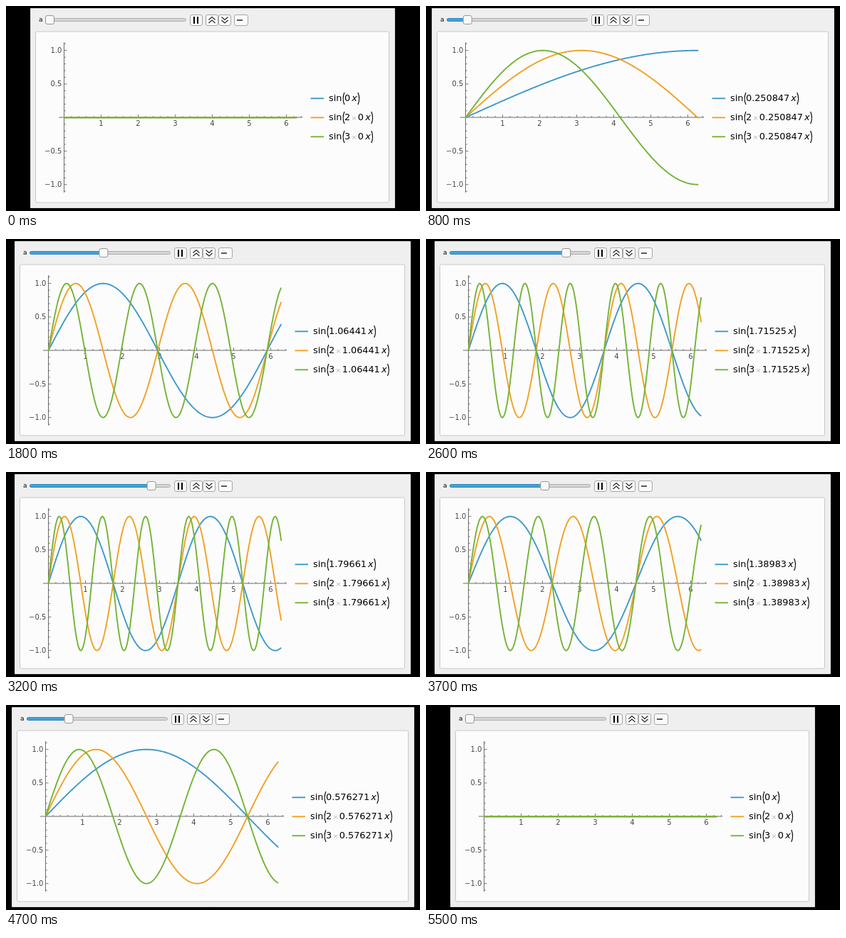
Write an HTML page with a canvas that moves like this. It is 581x289 px and loops after 6 s.

```html
<!DOCTYPE html>
<html lang="en">
<head>
<meta charset="utf-8">
<title>Sine family</title>
<style>
  html, body { margin: 0; width: 100%; height: 100%; overflow: hidden; background: #000; }
  canvas { display: block; }
</style>
</head>
<body>
<canvas id="stage" width="581" height="289"></canvas>
<script>
const ctx = document.getElementById('stage').getContext('2d');
const STAGE_W = 581, STAGE_H = 289;
const LOOP = 6000, HOLD = 500, STEP = 100, RISE = 25;
const COLORS = ['#3d99cc', '#f2a024', '#74b336'];
const FAMILY = 'px "DejaVu Sans", sans-serif';
const LEGEND = '12.8' + FAMILY;
const X0 = 47.5, Y0 = 157.2, UNIT_X = 52, UNIT_Y = 94.5;

// Triangle wave sampled every 100 ms, resting at zero on both ends.
function paramAt(t) {
  if (t < HOLD || t >= LOOP - HOLD) return 0;
  let n = Math.floor((t - HOLD) / STEP) + 1;
  if (n > RISE) n = 2 * RISE + 1 - n;
  return (4.8 * n - 4.4) / 59;
}

function line(points, color, width = 1) {
  ctx.beginPath();
  points.forEach(([x, y]) => ctx.lineTo(x, y));
  ctx.strokeStyle = color;
  ctx.lineWidth = width;
  ctx.stroke();
}

function box(x, y, w, h, r, fill, stroke) {
  ctx.beginPath();
  ctx.roundRect(x, y, w, h, r);
  ctx.fillStyle = fill;
  ctx.fill();
  ctx.strokeStyle = stroke;
  ctx.lineWidth = 1;
  ctx.stroke();
}

function text(s, x, y, font, color = '#000', align = 'left') {
  ctx.font = font;
  ctx.fillStyle = color;
  ctx.textAlign = align;
  ctx.fillText(s, x, y);
  return ctx.measureText(s).width;
}

function widthOf(s) {
  ctx.font = LEGEND;
  return ctx.measureText(s).width;
}

function button(x, w) {
  box(x + 0.5, 12.5, w - 1, 15, 2.5, '#fafafa', '#a6a6a6');
}

function chevrons(x, dir) {
  for (const y of [17.5, 22])
    line([[x - 4.5, y + 2 * dir], [x, y - 2 * dir], [x + 4.5, y + 2 * dir]], '#222', 1.1);
}

function controls(a) {
  text('a', 12, 22, '9' + FAMILY);
  const thumb = a ? 27.2 + 91.8 * a : 27.5;
  box(21.5, 17.5, 197, 4, 2, '#d6d6d6', '#adadad');
  if (a) box(21.5, 17.5, thumb - 21.5, 4, 2, '#3fa2dc', '#3585b5');
  box(thumb - 6, 13.5, 12, 12, 2.5, '#f8f8f8', '#969696');

  button(224, 18);
  ctx.fillStyle = '#000';
  ctx.fillRect(229, 15, 2, 10);
  ctx.fillRect(234, 15, 2, 10);
  button(246, 18);
  chevrons(255, 1);
  button(264, 18);
  chevrons(273, -1);
  button(286, 20);
  line([[290, 20], [299, 20]], '#000', 1.3);
  ctx.beginPath();
  ctx.moveTo(303, 20);
  ctx.lineTo(298, 17.4);
  ctx.lineTo(298, 22.6);
  ctx.fill();
}

function axes() {
  const ink = '#6b6b6b', label = '#484848', font = '10' + FAMILY;
  line([[40, 157], [382, 157]], ink);
  line([[X0, 51], [X0, 263]], ink);
  for (let i = 1; i <= 32; i++) {
    const x = X0 + i * UNIT_X / 5, major = i % 5 === 0;
    line([[x, 157], [x, major ? 153 : 155]], ink, 0.9);
    if (major) text(String(i / 5), x, 169, font, label, 'center');
  }
  for (let i = -11; i <= 11; i++) {
    if (!i) continue;
    const y = Y0 - i * UNIT_Y / 10, major = i % 5 === 0;
    line([[X0, y], [X0 + (major ? 4 : 2.3), y]], ink, 0.9);
    if (major)
      text((i < 0 ? '\u2212' : '') + Math.abs(i / 10).toFixed(1), 44.4, y + 3.5, font, label, 'right');
  }
}

function curve(freq, color) {
  const pts = [], end = 2 * Math.PI, n = 400;
  for (let i = 0; i <= n; i++) {
    const x = end * i / n;
    pts.push([X0 + UNIT_X * x, Y0 - UNIT_Y * Math.sin(freq * x)]);
  }
  line(pts, color, 1.9);
}

function paren(x, y, dir) {
  ctx.beginPath();
  ctx.moveTo(x + 1.6 * dir, y - 8);
  ctx.quadraticCurveTo(x - 2 * dir, y + 0.5, x + 1.6 * dir, y + 9);
  ctx.strokeStyle = '#000';
  ctx.lineWidth = 1.15;
  ctx.stroke();
}

function legend(num) {
  COLORS.forEach((color, i) => {
    const y = 130 + 27 * i, base = y + 4.3;
    line([[393.5, y + 0.3], [412, y + 0.3]], color, 1.9);
    text('sin', 419, base, LEGEND);
    paren(439.3, y, 1);
    let x = 441;
    if (i) {
      x += text(String(i + 1), x, base, LEGEND);
      text('\u00d7', x + 5.3, base - 0.4, '9.5' + FAMILY, '#b8b8b8', 'center');
      x += 10.7;
    }
    x += text(num, x, base, LEGEND) + 2.2;
    x += text('x', x, base, 'italic ' + LEGEND);
    paren(x + 2.6, y, -1);
  });
}

function draw(a) {
  const num = String(Number(a.toPrecision(6)));
  const w = Math.min(STAGE_W, Math.round(503.5 + widthOf(num)));
  const left = Math.floor((STAGE_W - w) / 2);
  ctx.fillStyle = '#000';
  ctx.fillRect(0, 0, STAGE_W, STAGE_H);
  ctx.save();
  ctx.translate(left, 0);
  box(0.5, 3.5, w - 1, 281, 0, '#efefef', '#dcdcdc');
  box(7.5, 36, w - 16, 241, 2, '#fcfcfc', '#c8c8c8');
  controls(a);
  axes();
  ctx.lineJoin = 'round';
  COLORS.forEach((color, i) => curve(a * (i + 1), color));
  legend(num);
  ctx.restore();
}

const start = performance.now();
function tick() {
  draw(paramAt((performance.now() - start) % LOOP));
  requestAnimationFrame(tick);
}
tick();
</script>
</body>
</html>
```
